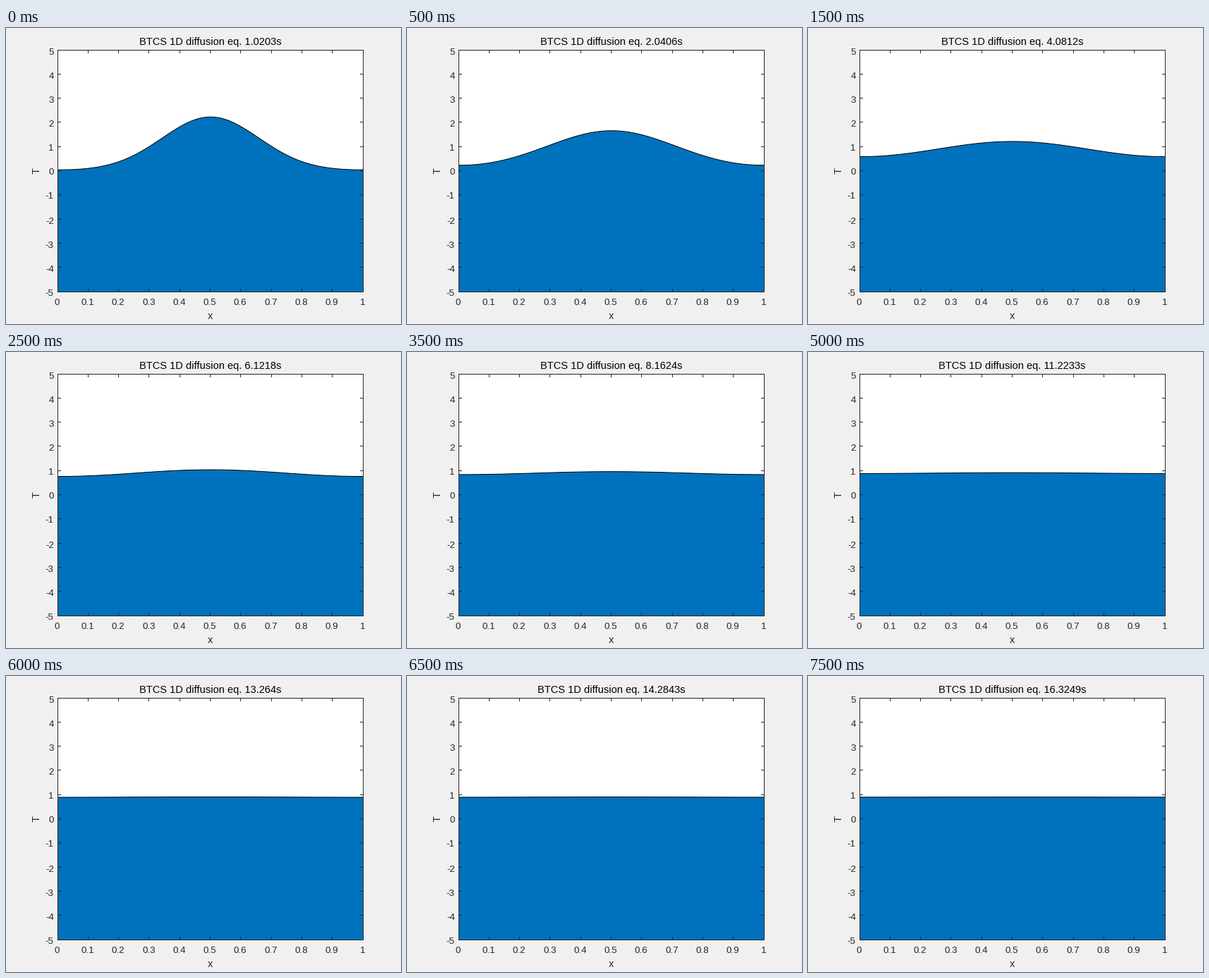
A matplotlib script for the animation above (8 s loop, 560 by 420 pixels).

```python
import numpy as np
import matplotlib.pyplot as plt
from matplotlib.animation import FuncAnimation
from matplotlib.patches import Rectangle

W, H, DPI = 560, 420, 80
PT = 72 / DPI  # points per pixel
FRAMES, INTERVAL = 16, 500
LEFT, TOP, RIGHT, BOTTOM = 73, 31, 506, 374  # pixel columns and rows of the box
INK = "#262626"

# Implicit (BTCS) heat equation with insulated ends
N, D, STEPS = 100, 0.01, 100
x = np.linspace(0, 1, N)
dx = x[1] - x[0]
dt = dx**2 / D
alpha = D * dt / dx**2


def step_matrix():
    a = (1 + 2 * alpha) * np.eye(N) - alpha * (np.eye(N, k=1) + np.eye(N, k=-1))
    a[0] = a[-1] = 0
    a[0, :2] = a[-1, -2:] = 1, -1
    rhs = np.eye(N)
    rhs[0, 0] = rhs[-1, -1] = 0
    return np.linalg.solve(a, rhs)


jump = np.linalg.matrix_power(step_matrix(), STEPS)
profiles = [jump @ (5 * np.exp(-((x - 0.5) / 0.1) ** 2))]
for _ in range(FRAMES - 1):
    profiles.append(jump @ profiles[-1])


def to_px(u):
    return LEFT + (RIGHT - LEFT) * u


def to_py(temp):
    return TOP + (BOTTOM - TOP) * (5 - temp) / 10


plt.rcParams["font.family"] = "Liberation Sans"
fig = plt.figure(figsize=(W / DPI, H / DPI), dpi=DPI, facecolor="#f0f0f0")
ax = fig.add_axes([0, 0, 1, 1])
ax.set_xlim(0, W)
ax.set_ylim(H, 0)
ax.axis("off")


def label(px, py, s, size, ha="center", **kw):
    return ax.text(px, py, s, fontsize=size * PT, color=INK, ha=ha,
                   va="baseline", **kw)


def block(px, py, w, h, color, zorder):
    ax.add_patch(Rectangle((px, py), w, h, fc=color, ec="none", lw=0,
                           snap=False, zorder=zorder))


def rule(px, py, w, h):
    block(px, py, w, h, INK, 4)


wide, tall = RIGHT - LEFT + 1, BOTTOM - TOP + 1
block(LEFT, TOP, wide, tall, "white", 0)
clip = Rectangle((LEFT, TOP), wide, tall, transform=ax.transData)

px = to_px(x) + 0.5
area, = ax.fill([0, 1, 1], [0, 0, 1], fc="#0072bd", ec="none", zorder=1)
curve, = ax.plot([], [], color="black", lw=PT, snap=False, zorder=2)
for art in (area, curve):
    art.set_clip_path(clip)

for col in (LEFT, RIGHT):
    rule(col, TOP, 1, tall)
for row in (TOP, BOTTOM):
    rule(LEFT, row, wide, 1)

TICK = 5
for i in range(11):
    col, row = int(to_px(i / 10)), int(to_py(5 - i))
    rule(col, TOP, 1, TICK)
    rule(col, BOTTOM + 1 - TICK, 1, TICK)
    rule(LEFT, row, TICK, 1)
    rule(RIGHT + 1 - TICK, row, TICK, 1)
    label(to_px(i / 10) - 0.5, 393, f"{i / 10:g}", 13.33)
    label(67.8, row + 6.5, str(5 - i), 13.33, ha="right")

label(290, 413, "x", 14.67)
label(48, 202.5, "T", 14.67, rotation=90, rotation_mode="anchor")
title = label(289.4, 24, "", 14.67)
title.set_color("black")


def draw(k):
    py = to_py(profiles[k])
    curve.set_data(px, py)
    area.set_xy(np.column_stack([np.r_[px, RIGHT + 1, RIGHT + 1, LEFT, LEFT],
                                 np.r_[py, py[-1], BOTTOM + 1, BOTTOM + 1, py[0]]]))
    t = f"{(k + 1) * STEPS * dt:.4f}".rstrip("0")
    title.set_text(f"BTCS 1D diffusion eq. {t}s")
    return area, curve, title


anim = FuncAnimation(fig, draw, frames=FRAMES, interval=INTERVAL,
                     repeat=True, repeat_delay=0)
plt.show()
```
